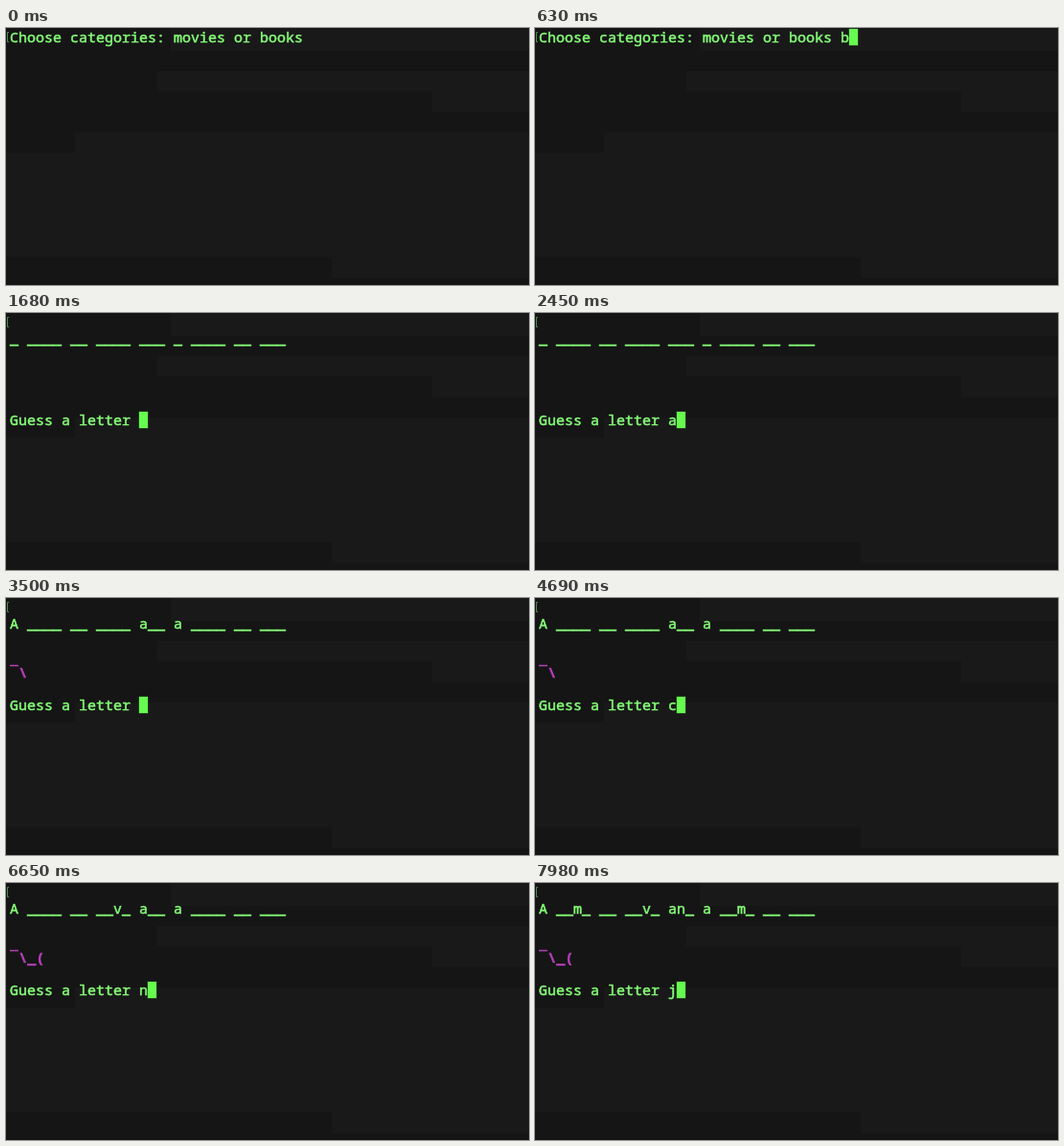
An HTML page that plays this animation: 546x268 px, repeating every 8000 ms.

```html
<!DOCTYPE html>
<html lang="en">
<head>
<meta charset="utf-8">
<title>Word guessing game</title>
<style>
  html, body { margin: 0; width: 100%; height: 100%; overflow: hidden; background: #191919; }
  svg { display: block; width: 100%; height: 100%; }
  text {
    font: 500 15px "Noto Sans Mono", "DejaVu Sans Mono", monospace;
    fill: #86fd78;
    stroke: #86fd78;
    stroke-width: 0.5;
    white-space: pre;
  }
  #shrug { fill: #b63fb9; stroke: #b63fb9; font-weight: 700; }
  #hand { stroke: #b63fb9; stroke-width: 1.5; }
  #cursor { fill: #67fb50; stroke: #67fb50; stroke-opacity: 0.3; }
  .shade { fill: #151515; }
  .mark { fill: none; stroke: #4c8a4f; }
</style>
</head>
<body>
<svg viewBox="0 0 546 268">
  <path class="shade" d="M0 0H172V24H546V45H158V66H445V88H546V109H72V130H0ZM0 239H340V261H546V268H0Z"/>
  <path class="mark" d="M3 4.5H1.5V14.5H3"/>
  <rect id="cursor" width="9" height="17"/>
  <text id="question" x="4" y="15"></text>
  <text id="words" x="4" y="31.7"></text>
  <path id="hand" d="M4 70.5H13"/>
  <text id="shrug" x="13.3" y="83"></text>
  <text id="prompt" x="4" y="117"></text>
</svg>
<script>
const LOOP = 8000;
const CELL = 9, LINE = 17, LEFT = 4, TOP = 1;
const QUESTION = "Choose categories: movies or books";
const GUESS = "Guess a letter ";
const BLANK = "_ ____ __ ____ ___ _ ____ __ ___";
const WITH_A = "A ____ __ ____ a__ a ____ __ ___";
const WITH_V = "A ____ __ __v_ a__ a ____ __ ___";
const WITH_N = "A ____ __ __v_ an_ a ____ __ ___";
const WITH_M = "A __m_ __ __v_ an_ a __m_ __ ___";

// Each step lists only what changes from the step before it.
const steps = [
  { at: 0, screen: "menu", input: "", cursor: false, words: "", hand: false, shrug: "" },
  { at: 70, cursor: true },
  { at: 490, input: "b" },
  { at: 700, input: "bo" },
  { at: 910, input: "boo" },
  { at: 1120, input: "book" },
  { at: 1260, input: "books" },
  { at: 1610, screen: "game", input: "", words: BLANK },
  { at: 2450, input: "a" },
  { at: 2730, input: "", words: WITH_A },
  { at: 2940, input: "s" },
  { at: 3080, input: "", hand: true },
  { at: 3290, input: "b" },
  { at: 3500, input: "", shrug: "\\" },
  { at: 3710, input: "c" },
  { at: 3920, input: "cv" },
  { at: 4690, input: "c" },
  { at: 4900, input: "", shrug: "\\_" },
  { at: 5460, input: "v" },
  { at: 5600, input: "", words: WITH_V },
  { at: 5810, input: "b" },
  { at: 5950, input: "", shrug: "\\_(" },
  { at: 6650, input: "n" },
  { at: 6790, input: "", words: WITH_N },
  { at: 6930, input: "m" },
  { at: 7070, input: "", words: WITH_M },
  { at: 7980, input: "j" }
];

const states = [];
steps.forEach((step, i) => states.push({ ...states[i - 1], ...step }));

const el = id => document.getElementById(id);
const show = (id, on) => el(id).setAttribute("visibility", on ? "visible" : "hidden");

function draw(state) {
  const menu = state.screen === "menu";
  const line = (menu ? QUESTION + " " : GUESS) + state.input;
  el("question").textContent = menu ? line : "";
  el("prompt").textContent = menu ? "" : line;
  el("words").textContent = state.words;
  el("shrug").textContent = state.shrug;
  el("cursor").setAttribute("x", LEFT + CELL * line.length);
  el("cursor").setAttribute("y", TOP + LINE * (menu ? 0 : 6));
  show("cursor", state.cursor);
  show("hand", state.hand);
}

const start = performance.now();
let shown;

function tick() {
  const time = (performance.now() - start) % LOOP;
  const state = states.findLast(s => s.at <= time);
  if (state !== shown) draw(shown = state);
  requestAnimationFrame(tick);
}
tick();
</script>
</body>
</html>
```
